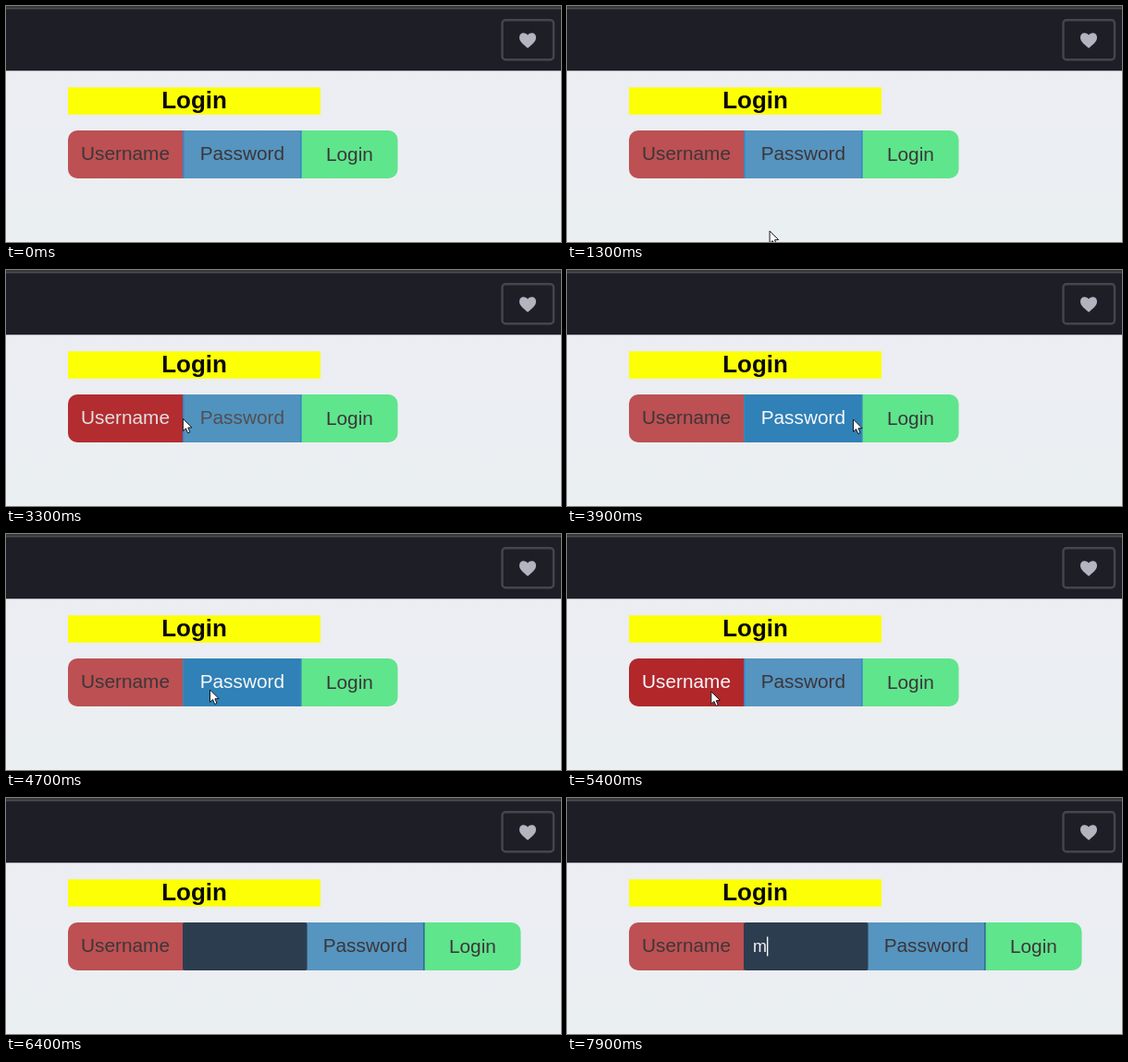
Write an HTML page with a canvas that moves like this. It is 600x256 px and loops after 8000 ms.

```html
<!DOCTYPE html>
<html lang="en">
<head>
<meta charset="utf-8">
<title>Login row</title>
<style>
html, body { margin: 0; width: 100%; height: 100%; overflow: hidden; background: #ebeff2; }
canvas { display: block; width: 600px; height: 256px; }
</style>
</head>
<body>
<canvas id="stage" width="600" height="256"></canvas>
<script>
const ctx = document.getElementById('stage').getContext('2d');
const FONT = '"Liberation Sans", Arial, sans-serif';
const LOOP = 8000, STEP = 100;
const LEFT = 67, SPLIT = 191, END = 319, RIGHT = 423.5;
const TOP = 135, HEIGHT = 52, ROUND = 10, GROW = 133;
const FOCUS = 5730, TYPE = 7700;

// Pointer stops
const stops = [
  { t: 1000, x: 232, y: 256 },
  { t: 2200, x: 149.5, y: 179 },
  { t: 3000, x: 150, y: 161 },
  { t: 3900, x: 309.5, y: 162 },
  { t: 4700, x: 220.5, y: 169 },
  { t: 5500, x: 153, y: 171 },
  { t: 6100, x: 153, y: 171 }
];

const clamp = v => Math.max(0, Math.min(1, v));
const smooth = k => k * k * (3 - 2 * k);
const mix = (a, b, k) => a + (b - a) * k;
const blend = (a, b, k) => `rgb(${a.map((v, i) => Math.round(mix(v, b[i], k)))})`;

function pointerAt(t) {
  const i = stops.findIndex(s => s.t >= t);
  if (i < 1) return null;
  const a = stops[i - 1], b = stops[i];
  const k = smooth((t - a.t) / (b.t - a.t));
  return { x: mix(a.x, b.x, k), y: mix(a.y, b.y, k) };
}

// Share of the last 200 ms the pointer spent over a label
function hover(t, x0, x1) {
  let hits = 0;
  for (let i = 0; i < 8; i++) {
    const p = pointerAt(t - i * 25);
    if (p && p.x >= x0 && p.x < x1 && p.y >= TOP && p.y < TOP + HEIGHT) hits++;
  }
  return hits / 8;
}

function rect(x, y, w, h, color, radius = 0) {
  ctx.fillStyle = color;
  ctx.beginPath();
  ctx.roundRect(x, y, w, h, radius);
  ctx.fill();
}

function text(str, x, y, color, font, align = 'center') {
  ctx.fillStyle = color;
  ctx.font = font + ' ' + FONT;
  ctx.textAlign = align;
  ctx.fillText(str, x, y);
}

function heart(x, y) {
  ctx.fillStyle = '#b4b3c0';
  ctx.beginPath();
  ctx.moveTo(x, y + 8.5);
  for (const s of [-1, 1]) {
    ctx.moveTo(x, y + 8.5);
    ctx.bezierCurveTo(x + s * 6, y + 3, x + s * 9, y + 1, x + s * 9, y - 3.4);
    ctx.bezierCurveTo(x + s * 9, y - 8.8, x + s * 3, y - 9.6, x, y - 5.8);
  }
  ctx.fill('nonzero');
}

function arrow({ x, y }) {
  ctx.save();
  ctx.translate(x, y);
  ctx.beginPath();
  [[0, 0], [0, 13.5], [3.1, 10.6], [5.2, 15.6], [7.5, 14.6], [5.4, 9.8], [9.6, 9.6]]
    .forEach(p => ctx.lineTo(...p));
  ctx.closePath();
  ctx.fillStyle = '#fff';
  ctx.fill();
  ctx.strokeStyle = '#15151a';
  ctx.lineWidth = 1;
  ctx.stroke();
  ctx.restore();
}

function page() {
  const bg = ctx.createLinearGradient(0, 70, 0, 256);
  bg.addColorStop(0, '#ecedf3');
  bg.addColorStop(1, '#eaeff1');
  rect(0, 0, 600, 256, bg);
  rect(0, 0, 600, 70.2, '#1e1e27');
  rect(0, 0, 600, 2, '#343737');
  rect(0, 2, 600, 1.5, '#4b4d4e');
  ctx.strokeStyle = '#45464d';
  ctx.lineWidth = 2.4;
  ctx.beginPath();
  ctx.roundRect(536.5, 15.2, 55.5, 43, 3.5);
  ctx.stroke();
  heart(564, 37.3);
  rect(LEFT, 88.2, 273, 29.5, '#fdff05');
  text('Login', 203.6, 111, '#0a0a08', 'bold 26px');
}

function label(str, x, w, textX, base, cool, hot, k, radius) {
  rect(x, TOP, w, HEIGHT, blend(cool, hot, k), radius);
  text(str, textX, base, blend([60, 54, 58], [248, 248, 250], k), '20.8px');
}

function caret(x, since) {
  if (since >= 0 && since % 1060 < 530) rect(x, 150.5, 1.4, 21, '#f4f6f8');
}

function draw(t) {
  page();
  const open = 1 - (1 - smooth(clamp((t - FOCUS) / 500))) ** 1.9;
  const d = GROW * open;
  const user = hover(t, LEFT, SPLIT), pass = hover(t, SPLIT, END);

  label('Username', LEFT, SPLIT - LEFT + 1, 129, 167.4,
    [189, 80, 82], [177, 39, 42], user, [ROUND, 0, 0, ROUND]);
  label('Password', SPLIT + d, END - SPLIT, 255.3 + d, 167.4,
    [85, 149, 192], [47, 129, 183], pass);
  label('Login', END + d, RIGHT - END, 371.4 + d, 168.2,
    [95, 229, 140], [46, 204, 113], 0, [0, ROUND, ROUND, 0]);

  // Closed inputs show as thin borders
  const edge = blend([56, 128, 205], [58, 136, 186], pass);
  rect(END - 0.8 + d, TOP, 1.4, HEIGHT, open ? blend([56, 128, 205], [42, 99, 145], open) : edge);
  if (open) rect(SPLIT, TOP, 1.5 + d, HEIGHT, blend([41, 128, 185], [44, 61, 80], open), 2);
  else rect(SPLIT, TOP, 1.4, HEIGHT, edge);

  if (t >= TYPE) {
    text('m', 201, 167, '#f2f4f6', '18px', 'left');
    caret(216, t - TYPE);
  } else {
    caret(201, t - FOCUS);
  }

  const tip = pointerAt(t);
  if (tip) arrow(tip);
}

function frame(now) {
  draw(Math.floor((now % LOOP) / STEP + 0.001) * STEP);
  requestAnimationFrame(frame);
}
draw(0);
requestAnimationFrame(frame);
</script>
</body>
</html>
```
